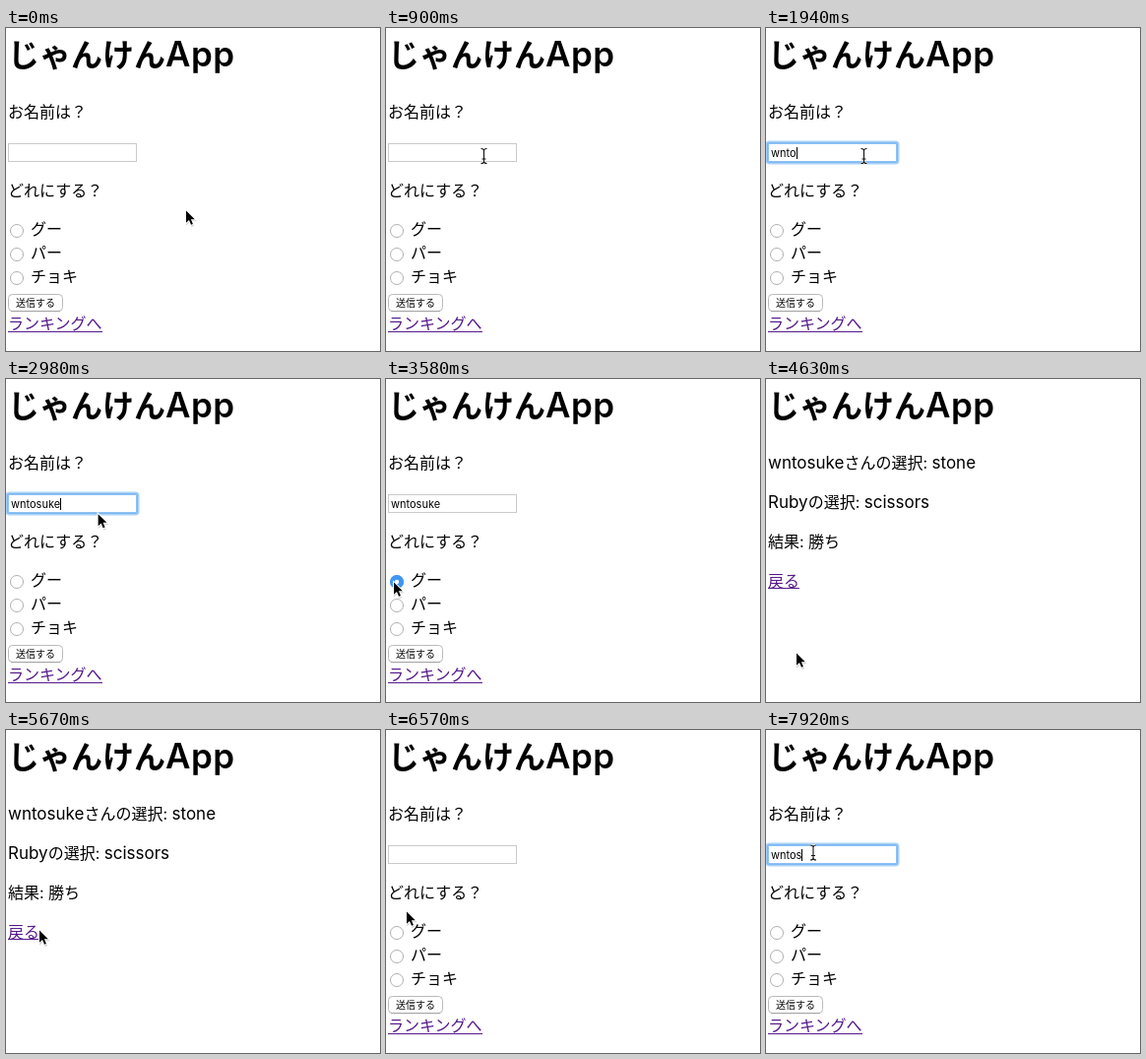
Write an HTML page that moves like this. It is 380 px wide and 328 px high and loops after 8000 ms.

```html
<!DOCTYPE html>
<html lang="ja">
<head>
<meta charset="utf-8">
<title>じゃんけんApp</title>
<style>
  html, body { margin: 0; width: 100%; height: 100%; overflow: hidden; background: #fff; }
  svg { display: block; width: 380px; height: 328px; }
  text { font: 16px Inter, "Noto Sans CJK JP", "Noto Sans CJK", sans-serif; white-space: pre; }
  .latin { font-size: 17px; }
  .title { font-size: 32px; font-weight: 700; }
  .app { font-size: 35px; font-weight: 600; letter-spacing: .5px; }
  .link { fill: #551a8b; }
  .typed { font-size: 11px; }
  .button { font-size: 10px; }
</style>
</head>
<body>
<svg viewBox="0 0 380 328">
  <rect width="380" height="328" fill="#fff"/>
  <text class="title" x="2" y="38.5">じゃんけん<tspan class="app">App</tspan></text>

  <g id="form">
    <text x="2" y="90.5">お名前は？</text>
    <g id="ring" fill="none">
      <rect x="1" y="116" width="133" height="21" rx="2.5" stroke="#a9d1f8" stroke-width="3"/>
      <rect x="2" y="117" width="131" height="19" rx="1" stroke="#6fb2f2" stroke-width="1.6"/>
    </g>
    <rect id="field" x="2.5" y="117.5" width="130" height="18" fill="#fff"/>
    <text id="typed" class="typed" x="5" y="131"></text>
    <rect id="caret" y="121" width="1" height="12"/>
    <text x="2" y="170.5">どれにする？</text>
    <g id="radios"></g>
    <g id="chosen">
      <circle cx="11" cy="206" r="7" fill="#3e96f4"/>
      <circle cx="11" cy="206" r="2.2" fill="#fff"/>
    </g>
    <rect x="2.5" y="270.5" width="55" height="17" rx="4" fill="#fff" stroke="#bababa"/>
    <path d="M5 287.7h50" stroke="#a2a2a2"/>
    <text class="button" x="10" y="283">送信する</text>
    <text class="link" x="2" y="306">ランキングへ</text>
    <path d="M2 308.5h96" stroke="#551a8b"/>
  </g>

  <g id="result">
    <text x="2" y="91"><tspan id="player" class="latin"></tspan>さんの選択: <tspan class="latin">stone</tspan></text>
    <text x="2" y="131"><tspan class="latin">Ruby</tspan>の選択: <tspan class="latin">scissors</tspan></text>
    <text x="2" y="171">結果: 勝ち</text>
    <text class="link" x="2" y="211">戻る</text>
    <path d="M2 212.5h32" stroke="#551a8b"/>
  </g>

  <g id="arrow">
    <path d="M1 2V16.5L4.5 13.5 6.5 18 9.3 16.8 7.4 12.3H12Z" opacity=".18"/>
    <path d="M1 1.6V13.8L4 11 6 15.8 7.9 15 5.9 10.3H9.8Z"
      stroke="#fff" stroke-width="2" paint-order="stroke"/>
  </g>
  <g id="beam" fill="none">
    <path id="halo" stroke="#fff" stroke-width="2.6"/>
    <path id="stem" stroke="#111" stroke-width="1.1"/>
  </g>
</svg>
<script>
const $ = id => document.getElementById(id);
const LOOP = 8000;
const BEAT = 149.1;  // the picture changes only on beats
const NAME = 'wntosuke';
const HOME = { x: 182, y: 184 };

// Where the pointer heads, in beats; it rests between moves.
const moves = [
  { from: 0, to: 4, x: 120, y: 137 },
  { from: 5, to: 6, x: 99.5, y: 130 },    // text field
  { from: 18, to: 24, x: 7, y: 205 },     // first option
  { from: 25, to: 29, x: 30, y: 277 },    // send button
  { from: 32, to: 35, x: 121, y: 206 },
  { from: 36, to: 37, x: 72, y: 128 },
  { from: 37, to: 38, x: 33, y: 202 },    // back link
  { from: 41, to: 44, x: 20, y: 183 },
  { from: 44, to: 46, x: 48, y: 124.5 }   // text field again
];

const clamp = (v, lo, hi) => Math.min(hi, Math.max(lo, v));
const ease = p => p * p * (3 - 2 * p);
const show = (id, on) => { $(id).style.display = on ? '' : 'none'; };

function pointerAt(beat) {
  return moves.reduce((p, m) => {
    const k = ease(clamp((beat - m.from) / (m.to - m.from), 0, 1));
    return { x: p.x + (m.x - p.x) * k, y: p.y + (m.y - p.y) * k };
  }, HOME);
}

const letters = (beat, from, rate) => clamp(Math.round((beat - from) * rate), 0, NAME.length);

$('player').textContent = NAME;
$('radios').innerHTML = ['グー', 'パー', 'チョキ'].map((label, i) => {
  const y = 206 + 24 * i;
  return `<circle cx="11" cy="${y}" r="6.5" fill="#fff" stroke="#b0b0b0"/>
    <text x="25" y="${y + 4}">${label}</text>`;
}).join('');

const serif = s => `M-3 ${7.5 * s}Q0 ${7.5 * s} 0 ${5.5 * s}Q0 ${7.5 * s} 3 ${7.5 * s}`;
for (const id of ['halo', 'stem'])
  $(id).setAttribute('d', serif(-1) + serif(1) + 'M0 -5.5V5.5M-2 3H2');

function draw(t) {
  const beat = Math.floor(t / BEAT);
  const during = (from, to = Infinity) => beat >= from && beat < to;
  const onResult = during(31, 41);
  const focused = during(8, 24) || during(48);
  const overField = during(6, 19) || during(46);

  show('form', !onResult);
  show('result', onResult);
  show('ring', focused);
  show('caret', focused);
  show('chosen', during(24, 31));
  show('arrow', !overField);
  show('beam', overField);

  $('field').setAttribute('stroke', focused ? '#8fc2f4' : '#cacaca');
  const count = during(41) ? letters(beat, 50, 5 / 3) : letters(beat, 10, 4 / 3);
  $('typed').textContent = NAME.slice(0, count);
  if (focused) $('caret').setAttribute('x', Math.round(5 + $('typed').getComputedTextLength()));

  const { x, y } = pointerAt(beat);
  $(overField ? 'beam' : 'arrow').setAttribute('transform', `translate(${x} ${y})`);
}

const start = performance.now();
function tick() {
  draw((performance.now() - start) % LOOP);
  requestAnimationFrame(tick);
}
tick();
</script>
</body>
</html>
```
